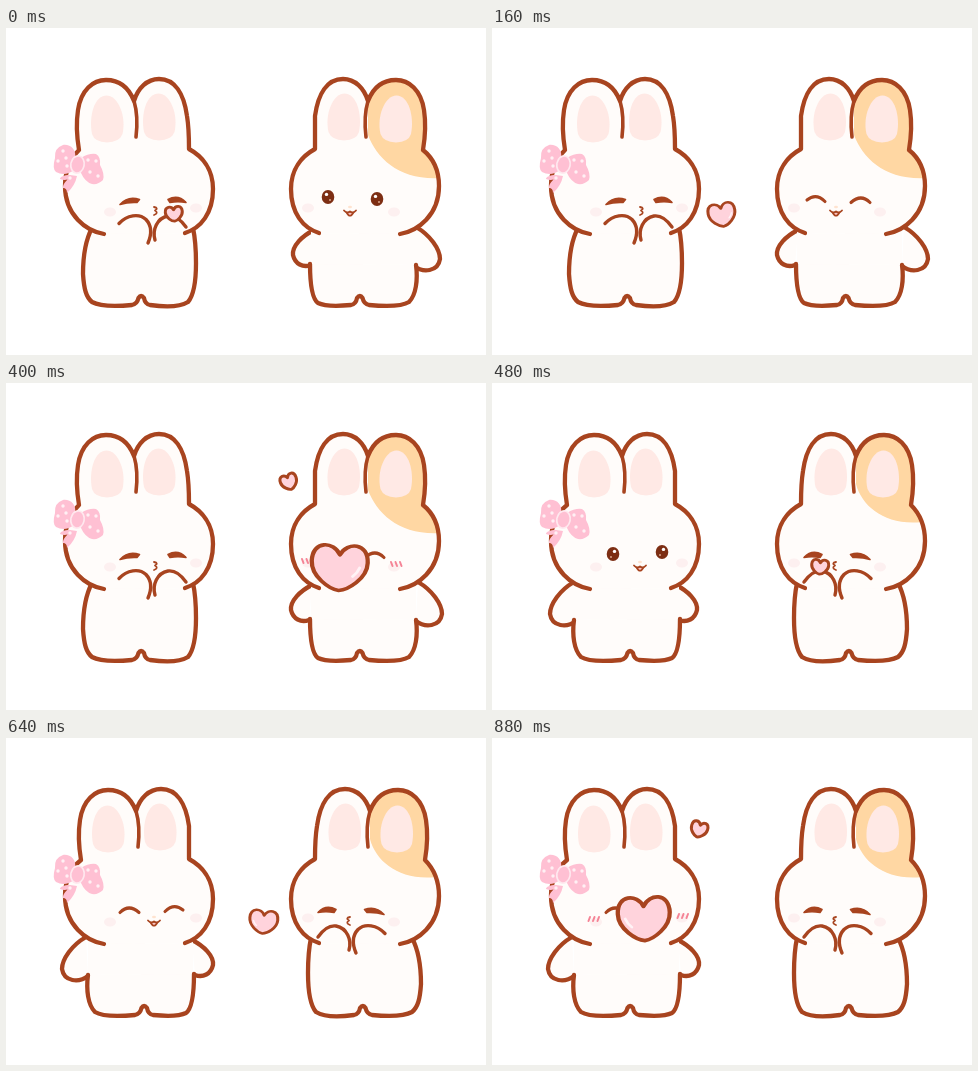
These frames come from a looping animation (480 by 327 pixels, 960 ms). An HTML page with a canvas:

```html
<!DOCTYPE html>
<html lang="en">
<head>
<meta charset="utf-8">
<title>Bunny kisses</title>
<style>
  html, body { margin: 0; width: 100%; height: 100%; overflow: hidden; background: #fff; }
  canvas { display: block; }
</style>
</head>
<body>
<canvas id="stage" width="480" height="327"></canvas>
<script>
const ctx = document.getElementById('stage').getContext('2d');
const STEP = 80, STEPS = 12, MIRROR = 492;
const LINE = '#a8441f', SKIN = '#fffcfa', PINK = '#ffe9e5', ORANGE = '#ffd7a3', ROSE = '#ffc0d3';

// x, y, width, height, tilt of the flying heart for each step
const FLIGHT = [
  [168, 186, 17, 15, -.1], [198, 187, 22, 20, -.15], [230, 187, 27, 24, -.18],
  [271.5, 185, 32, 34, -.1], [303, 184, 45, 42, -.03], [333.5, 185, 56, 47, .04],
  [328, 184, 17, 15, .1], [293, 184, 22, 20, .12], [257.5, 184, 28, 24, .1],
  [222, 184, 32, 33, .08], [187, 183, 44, 41, .03], [152, 181, 52, 45, -.04]
];
const HEART = new Path2D('M0-.28C-.12-.57-.5-.57-.5-.13C-.5.21-.16.46 0 .48C.16.46.5.21.5-.13C.5-.57.12-.57 0-.28Z');

// The ears sit e pixels further right in the resting pose.
function headPath(e) {
  return new Path2D(`M98 206C80 203 59 187 59 158C59 142 65 130 ${73 + e} 122
    C${71 + e} 110 ${70 + e} 95 ${72 + e} 82C${75 + e} 62 ${87 + e} 52 ${100 + e} 52
    C${114 + e} 52 ${123 + e} 60 ${128 + e} 73C${132 + e} 60 ${141 + e} 51 ${153 + e} 51
    C${169 + e} 51 ${178 + e} 66 ${181 + e} 88C183 100 183 112 183 121
    C196 128 207 141 207 161C207 185 195 200 179 205`);
}

function fill(path, color) {
  ctx.fillStyle = color;
  ctx.fill(typeof path === 'string' ? new Path2D(path) : path);
}

function stroke(path, width = 4.3, color = LINE) {
  ctx.lineWidth = width;
  ctx.strokeStyle = color;
  ctx.stroke(typeof path === 'string' ? new Path2D(path) : path);
}

function shape(path, color = SKIN, width) {
  fill(path, color);
  stroke(path, width);
}

function oval(x, y, rx, ry, color, tilt = 0) {
  ctx.beginPath();
  ctx.ellipse(x, y, rx, ry, tilt, 0, 7);
  ctx.fillStyle = color;
  ctx.fill();
}

function shifted(dx, dy, draw) {
  ctx.save();
  ctx.translate(dx, dy);
  draw();
  ctx.restore();
}

function bow() {
  fill('M64 147C58 147 54 149 54 151Q59 153 62 151Q56 157 57 160Q61 160 61 165Q69 158 71 148Z', ROSE);
  fill('M69 131C71 121 64 116 57 117Q48 120 49 130Q46 141 50 144Q59 149 68 142Z', ROSE);
  fill('M75 130Q83 125 90 126Q95 129 94 137Q99 146 97 152Q92 157 86 156Q79 154 75 145Z', ROSE);
  [[57, 123], [52, 133], [61, 138], [60, 130], [82, 132], [90, 133], [84, 144], [92, 148], [64, 150]]
    .forEach(([x, y]) => oval(x, y, 1.7, 1.7, '#fff0f4'));
  oval(71.5, 136.5, 7.5, 9.5, '#ffe9ef', .2);
  oval(71.5, 136.5, 5.8, 7.8, ROSE, .2);
}

function kissBody() {
  shape(`M86 200C78 215 77 232 77 246C78 261 80 269 86 274C95 279 115 278 126 277
    Q131 276 132.5 270Q135 266 138 270Q139 276 144 277C158 279 174 279 182 274C188 267 190 250 190 235Q190 214 187 200`);
}

function restBody(pull) {
  shifted(pull, 0, () => shape('M80 199C66 207 56 221 56 231C58 244 73 245 82 238'));
  shifted(-pull, 0, () => shape('M186 202C198 208 208 218 207 227C205 236 197 240 189 237'));
  ctx.fillStyle = SKIN;
  ctx.fillRect(82, 190, 105, 52);
  shape(`M82 237C80 252 82 267 89 274C97 279 118 278 129 277Q134 276 135.5 270
    Q138 266 141 270Q142 276 147 277C158 278 172 279 180 275C187 270 188 252 188 236`);
}

function ears(e) {
  const inner = 'M86.5 106C83 88 89 67.5 101 67.5C113 67.5 121 89 117 106Q114 114 101.5 114.5Q89 114 86.5 106Z';
  shifted(e / 2 - .5, 0, () => fill(inner, PINK));
  shifted(51.5 + e / 2, -2, () => fill(inner, PINK));
}

function kissFace() {
  shape('M114 176.5Q122 167.5 133.5 171.5L131 174.5Q122 174 114 176.5Z', LINE, 1.6);
  shape('M162 171.5Q172 166 180 174.5Q172 173 164 174.5Z', LINE, 1.6);
  stroke('M148 179Q153 180 149 182.5Q153 185 148 187', 1.8);
  stroke('M113 195.5C121 187 133 185 140 191.5C147 199 145 208 142 215', 3.4);
  stroke('M149 212C146 202 151 190 162 188C169 187 175 192 180 199', 3.4);
}

function restFace(open) {
  if (open) {
    [[121, 171], [170, 169]].forEach(([x, y]) => {
      oval(x, y, 6.3, 7, '#7d2e13');
      oval(x + 1.5, y - 2.6, 1.7, 1.7, '#fff');
      oval(x - 2, y + 3, 1, 1, '#d9a48c');
    });
  } else {
    stroke('M114 174.5Q123 165.5 133 174.5M159 173.5Q168 164.5 177 172', 3.1);
  }
  oval(148, 179, 2, 1.2, '#ffe3d0');
  shape('M144.5 184.5Q148 191 151.5 184.5', '#ffc9c9', 1.6);
  stroke('M142 182.5Q145 186 148 183.5Q151 186 154 182.5', 1.8);
}

function bunny({ kissing, open, blushing, patched }) {
  const e = kissing ? 0 : 2, head = headPath(e);
  ctx.save();
  if (patched) ctx.transform(-1, 0, 0, 1, MIRROR, 0);
  if (kissing) kissBody();
  else restBody(open ? 2 : 0);

  fill(head, SKIN);
  if (patched) {
    ctx.save();
    ctx.clip(head);
    fill(kissing ? 'M128 40V101C122 124 98 143 62 139H40V40Z'
                 : 'M130 40V107C121 131 98 153 56 150H40V40Z', ORANGE);
    ctx.restore();
  }
  ears(e);
  stroke(head);
  shifted(e, 0, () => stroke('M128 73Q132.5 88 130 109', 3.6));

  oval(104, 184, 6, 4.5, '#fdf0f0');
  oval(190, 180, 6, 4.5, '#fdf0f0');
  if (blushing) {
    const marks = 'M98 179l-1.5 4M102.5 179l-1.5 4M107 179l-1.5 4';
    stroke(marks, 2, '#f58496');
    shifted(89, -3, () => stroke(marks, 2, '#f58496'));
  }
  if (kissing) kissFace();
  else restFace(open);
  if (!patched) bow();
  ctx.restore();
}

function heart(x, y, w, h, tilt, shine = 0) {
  ctx.save();
  ctx.translate(x, y);
  ctx.rotate(tilt);
  ctx.scale(w, h);
  shape(HEART, '#ffd3dc', (w > 40 ? 4.3 : 3) / w);
  if (shine) {
    ctx.scale(shine, 1);
    stroke('M.36-.02Q.32.1 .24.17', .055, '#fff3f6');
  }
  ctx.restore();
}

function render(time) {
  const step = Math.floor(time / STEP) % STEPS;
  const beat = step % 6, leftKisses = step < 6;
  const receiver = { kissing: false, open: beat < 2, blushing: beat === 5 };
  const kisser = { kissing: true };

  ctx.fillStyle = '#fff';
  ctx.fillRect(0, 0, 480, 327);
  bunny(leftKisses ? kisser : receiver);
  bunny({ ...(leftKisses ? receiver : kisser), patched: true });
  heart(...FLIGHT[step], beat > 1 ? (leftKisses ? 1 : -1) : 0);
  if (beat === 5) {
    if (leftKisses) heart(283, 99, 16.5, 16, -.35);
    else heart(207, 91.5, 16.5, 16, .3);
  }
}

ctx.lineCap = ctx.lineJoin = 'round';
const start = performance.now();
function loop() {
  render(performance.now() - start);
  requestAnimationFrame(loop);
}
loop();
</script>
</body>
</html>
```
